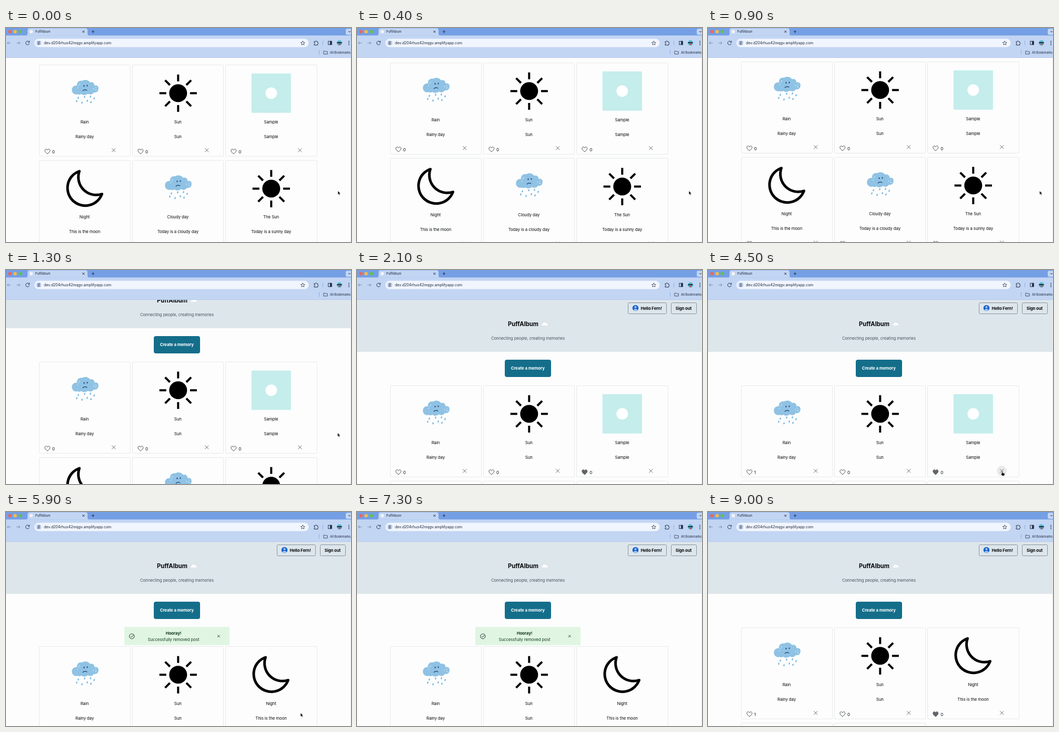
An HTML page that plays this animation: 656 by 408 pixels, repeating every 9100 ms.

```html
<!DOCTYPE html>
<html lang="en">
<head>
<meta charset="utf-8">
<title>PuffAlbum</title>
<style>
html, body { margin: 0; width: 100%; height: 100%; overflow: hidden; }
body {
  position: relative; background: #fdfdfd; color: #06090c;
  font: 7.8px/10px Inter, "Open Sans", sans-serif; letter-spacing: -.01em;
}
#stage { position: absolute; left: 0; top: 0; width: 656px; height: 408px; overflow: hidden; }
#stage * { box-sizing: border-box; }
#page, #page div, #page svg, #cards, #cursor, .bar { position: absolute; }
#page { left: 0; top: 0; width: 656px; height: 700px; }
#stage svg { overflow: visible; }
.bar { left: 0; top: 0; }
.mid { text-align: center; white-space: nowrap; }
b { font-weight: 700; }

.hero { left: 0; top: 57px; width: 656px; height: 98.5px; background: #dde6eb; }
.title { left: 287px; top: 95.5px; font: 700 11.2px/14px Inter, sans-serif; letter-spacing: 0; }
.tag { left: 225px; top: 125px; width: 200px; color: #4a545e; }
.btn { top: 62px; height: 21.5px; border: 1px solid #87929b; border-radius: 2.5px; line-height: 20px; font-weight: 700; }
.create {
  left: 281px; top: 170.5px; width: 87.5px; height: 33px; border-radius: 4px;
  background: #146e8a; color: #fff; font-weight: 700; line-height: 33px;
}
.toast { left: 225px; top: 219px; width: 199.5px; height: 35px; background: #e0f6e3; color: #173a22; }
.toast .mid { left: 0; top: 6px; width: 187px; line-height: 12px; }

#cards { left: 0; top: 0; }
.card { width: 174.5px; height: 174.5px; border: 1px solid #e8e9ea; border-radius: 2px; }
.card svg { left: -1px; top: -1px; }
.card .name, .card .note { left: -1px; width: 174px; }
.name { top: 102.3px; }
.note { top: 130.3px; }
.num { left: 24.2px; top: 159.5px; font-size: 8px; }
.heart { fill: none; stroke: #42474c; stroke-width: 1; }
.cross { fill: none; stroke: #555b60; stroke-width: .9; }

/* One loop is 9100 ms, so 1.0989% is 100 ms */
.a { animation: 9100ms step-end infinite; }
#page { animation-name: scroll; }
@keyframes scroll {
  0% { transform: translateY(-150px); animation-timing-function: steps(4, end); }
  4.39% { transform: translateY(-154px); animation-timing-function: steps(5, end); }
  9.88% { transform: translateY(-156px); }
  12.08% { transform: translateY(-128px); }
  13.18% { transform: translateY(-85px); }
  14.28% { transform: translateY(-45px); }
  15.38% { transform: translateY(-24px); }
  16.48% { transform: translateY(-11px); }
  17.58% { transform: translateY(-4px); }
  18.68%, 100% { transform: none; }
}
#cards { animation-name: push; }
@keyframes push {
  0% { transform: none; }
  64.83% { transform: translateY(36px); }
  97.8%, 100% { transform: none; }
}
.toast { animation-name: toast; }
@keyframes toast { 0% { opacity: 0; } 64.83% { opacity: 1; } 97.8%, 100% { opacity: 0; } }
.until { animation-name: until; }
@keyframes until { 0% { opacity: 1; } 61.53%, 100% { opacity: 0; } }
.after { animation-name: after; }
@keyframes after { 0% { opacity: 0; } 61.53%, 100% { opacity: 1; } }
.before-like { animation-name: unliked; }
@keyframes unliked { 0% { opacity: 1; } 29.67%, 100% { opacity: 0; } }
.liked { animation-name: liked; }
@keyframes liked { 0% { opacity: 0; } 29.67%, 100% { opacity: 1; } }
.fill { animation-name: fill; fill: #5e6367; }
@keyframes fill { 0% { opacity: 0; } 20.87%, 100% { opacity: 1; } }
.hover { animation-name: hover; fill: #e9eaeb; }
@keyframes hover { 0% { opacity: 0; } 49.45% { opacity: 1; } 64.83%, 100% { opacity: 0; } }

#cursor { left: 0; top: 0; width: 12px; height: 14px; animation-name: point; }
@keyframes point {
  0% { transform: translate(631px, 310.5px); }
  9.88% { transform: translate(630.5px, 310.5px); }
  16.48% { transform: translate(600px, 330px); }
  17.58% { transform: translate(520px, 362px); }
  18.68% { transform: translate(460px, 379px); }
  19.78% { transform: translate(433px, 385px); }
  23.07% { transform: translate(-40px, 0); }
  24.17% { transform: translate(200px, 388px); }
  25.27% { transform: translate(110px, 386px); }
  26.37% { transform: translate(79px, 385px); }
  30.76% { transform: translate(84px, 395px); }
  31.86% { transform: translate(-40px, 0); }
  45.05% { transform: translate(500px, 402px); }
  46.15% { transform: translate(528px, 394px); }
  47.25% { transform: translate(548px, 387px); }
  48.35% { transform: translate(557px, 384px); }
  49.45% { transform: translate(560px, 383px); }
  69.23% { transform: translate(572px, 350px); }
  70.32% { transform: translate(602px, 300px); }
  71.42% { transform: translate(622px, 271.5px); }
  80.21%, 100% { transform: translate(-40px, 0); }
}
.hand { animation-name: hand; }
@keyframes hand {
  0% { opacity: 0; } 19.78% { opacity: 1; } 23.07% { opacity: 0; }
  26.37% { opacity: 1; } 30.76% { opacity: 0; }
  49.45% { opacity: 1; } 64.83%, 100% { opacity: 0; }
}
.arrow { animation-name: arrow; }
@keyframes arrow {
  0% { opacity: 1; } 19.78% { opacity: 0; } 23.07% { opacity: 1; }
  26.37% { opacity: 0; } 30.76% { opacity: 1; }
  49.45% { opacity: 0; } 64.83%, 100% { opacity: 1; }
}
</style>
</head>
<body>
<svg width="0" height="0" style="position:absolute">
  <defs>
    <!-- Pictures are drawn around their own centre -->
    <g id="rain">
      <path fill="#8fc2e4" d="M-14 2C-20 3.500-25 0-25-6-25-12-21-15-15.500-14.500-16-21-11-25-5.500-23.500-1-26.500 7-25.500 9.500-20.500 14-22 18-19.500 18-14.500 23-16 26-13 25.500-8.500 25.500-3 21.500-.5 16.500-1.500 14.500 2.500 9.500 3.500 5.500 1 2 4-4 4.500-7 1.500-9 3-12 3-14 2Z"/>
      <g fill="#1d3f6e"><ellipse cx="-1.800" cy="-14" rx="1" ry="1.600"/><ellipse cx="4.200" cy="-14.500" rx="1" ry="1.600"/></g>
      <path d="M-4-4.800Q-.5-8 3.500-5.500" fill="none" stroke="#1d3f6e" stroke-width="1.300" stroke-linecap="round"/>
      <g fill="#e6f3fb">
        <circle cx="16" cy="-8.500" r=".9"/><circle cx="20.500" cy="-10.500" r=".8"/><circle cx="20.500" cy="-6" r="1"/>
        <circle cx="-14" cy="-10" r=".8"/><circle cx="-10.500" cy="-17" r=".9"/><circle cx="-12.500" cy="-14" r=".7"/>
      </g>
      <g id="drops" fill="#78b6e2"></g>
    </g>
    <g id="sun"><circle r="17"/><g id="rays"></g></g>
    <path id="moon" transform="translate(-.8 -.3)" d="M-10-33A33.800 33.800 0 1 0 33 10.500A34 34 0 0 1-10-33Z" fill="none" stroke="#000" stroke-width="5" stroke-linejoin="round"/>
    <g id="sample"><path d="M-37.500-37.500h75v75h-75z" fill="#c4edec"/><circle r="11" fill="#fff"/></g>
    <path id="heart" d="M0 4.700C-3 2.200-4.900.600-4.900-1.700-4.900-4.900-1.200-5.300 0-2.600 1.200-5.300 4.900-4.900 4.900-1.700 4.900.600 3 2.200 0 4.700Z"/>
    <path id="x" d="M-3.500-3.500L3.500 3.500M3.500-3.500L-3.500 3.500"/>
  </defs>
</svg>

<div id="stage">
  <div id="page" class="a">
    <div class="hero"></div>
    <div class="btn" style="left:515px;width:74px;padding-left:23.500px">Hello Fern!</div>
    <svg class="bar" width="1" height="1">
      <circle cx="529.500" cy="72.500" r="5.800" fill="#1d62d0"/>
      <circle cx="529.500" cy="70.800" r="2" fill="#a9cdf7"/>
      <path d="M525.800 76.500a3.800 3.300 0 0 1 7.400 0a5.500 5.500 0 0 1-7.400 0Z" fill="#a9cdf7"/>
      <path d="M352.500 106.500a2.500 2.500 0 0 1 .5-4.800a3.500 3.500 0 0 1 6-1.300a3 3 0 0 1 3.300 2.300a2 2 0 0 1-.3 3.800Z" fill="#fafcfd" stroke="#c5ced4" stroke-width=".5"/>
    </svg>
    <div class="btn mid" style="left:596.500px;width:49px">Sign out</div>
    <div class="title">PuffAlbum</div>
    <div class="tag mid">Connecting people, creating memories</div>
    <div class="create mid">Create a memory</div>
    <div id="cards" class="a"></div>
    <div class="toast a">
      <svg class="bar" width="1" height="1" fill="none" stroke="#1f3326">
        <circle cx="14.300" cy="18" r="4.700"/><path d="M12 18l1.800 1.800 4-4.500"/>
        <use href="#x" transform="translate(179.300 17.800) scale(.62)" stroke-width="1.400"/>
      </svg>
      <div class="mid"><b>Hooray!</b><br>Successfully removed post</div>
    </div>
  </div>

  <svg class="bar" width="656" height="408">
    <path d="M0 0h656v57H0z" fill="#c2d5f3"/>
    <path d="M0 0h656v14.300H0z" fill="#759fe5"/>
    <path d="M37 14.500q4 0 4-4V4.500q0-4 4-4h106q4 0 4 4v6q0 4 4 4z" fill="#c2d5f3"/>
    <path d="M0 56.500h656" stroke="#b7caea"/>
    <path d="M655.500 57v351" stroke="#ececec"/>
    <circle cx="7.500" cy="7" r="3.200" fill="#ee655b"/>
    <circle cx="17.300" cy="7" r="3.200" fill="#f2bd4b"/>
    <circle cx="27.200" cy="7" r="3.200" fill="#5ec251"/>
    <circle cx="48" cy="7" r="3.200" fill="#f1f3f5"/>
    <rect x="54" y="20.500" width="521.500" height="16" rx="8" fill="#f1f5fd"/>
    <circle cx="62.300" cy="28.500" r="5.700" fill="#d5e2f8"/>
    <rect x="646" y="1.500" width="14" height="11.500" rx="3" fill="#c2d5f3"/>
    <g fill="#1e2a3c" font-family="Inter, sans-serif">
      <text x="55.800" y="9.200" font-size="6">PuffAlbum</text>
      <text x="72" y="31" font-size="7.120">dev.d204rhuo42mqgv.amplifyapp.com</text>
      <text x="616" y="48.700" font-size="5.950">All Bookmarks</text>
      <circle cx="652" cy="25.300" r=".9"/><circle cx="652" cy="28.500" r=".9"/><circle cx="652" cy="31.700" r=".9"/>
    </g>
    <g fill="none" stroke="#26334a" stroke-width="1">
      <path d="M145.300 5l4 4m0-4l-4 4M165.500 4.200v5.600m-2.800-2.800h5.600M651 6l2 2 2-2"/>
      <path d="M43.800 26.500a3.500 3.500 0 1 0 .5 3M44.500 24.500v2.700h-2.700"/>
      <path d="M59.300 26.800h2m2.800 0h1.300M59.300 30.300h1.300m2.600 0h2.200"/>
      <circle cx="62.600" cy="26.800" r="1"/><circle cx="61.900" cy="30.300" r="1"/>
      <path d="M564.300 24.700l1.100 2.600 2.800.2-2.100 1.900.6 2.800-2.400-1.500-2.400 1.500.6-2.800-2.100-1.900 2.800-.2z" stroke-width=".8"/>
      <path d="M586 26h2a1.300 1.300 0 0 1 2.600 0h2v2a1.300 1.300 0 0 1 0 2.600v2H586v-2a1.300 1.300 0 0 0 0-2.600z"/>
      <rect x="612.800" y="25.300" width="6.400" height="6.400"/>
      <path d="M616.500 25.300h2.700v6.400h-2.700z" fill="#26334a"/>
      <path d="M604 44h2.500l1 1h3.700v4.700H604z" stroke-width=".8"/>
      <path d="M602.500 24.500v8M595.500 42v9" stroke="#8fb0e8"/>
      <path d="M9 28.500H2.500m2.700-2.800l-2.800 2.800 2.800 2.800M20 28.500h6.500m-2.700-2.800l2.800 2.800-2.800 2.800" stroke="#7e90b0"/>
    </g>
    <circle cx="634" cy="28.500" r="5" fill="#4fb6d2"/>
    <path d="M629.500 27h9v2h-9z" fill="#22262e"/>
    <path d="M632 30h5l-1 2.500h-3z" fill="#c94a55"/>
  </svg>

  <div id="cursor" class="a">
    <svg class="bar" width="12" height="14" stroke="#fff" stroke-width=".6">
      <path class="a arrow" d="M0 0v7.300l1.700-1.500 1.200 2.700 1.300-.6-1.200-2.600h2.300z"/>
      <path class="a hand" d="M-1.500.800q.8-.9 1.600 0v3l2.800.6q1.400.3 1.200 1.700l-.6 3.200H-.900l-2.300-3.600q.3-1.200 1.700 0z"/>
    </svg>
  </div>
</div>

<script>
const $ = id => document.getElementById(id);

const drops = [[-13, 9], [-1, 7], [10, 6.500], [17, 10], [-16, 15], [-6, 18], [4, 14.500], [11, 17]];
$('drops').innerHTML = drops.map(([x, y]) =>
  `<path transform="translate(${x} ${y})" d="M.8-2.500Q2.300 1 .500 2-1.500 2.300-1.300.300-.900-1 .8-2.500Z"/>`).join('');
$('rays').innerHTML = [...Array(8).keys()].map(i =>
  `<path transform="rotate(${i * 45})" d="M-2-${i % 2 ? 35 : 35.6}h4v13h-4z"/>`).join('');

const body = (pic, name, note, cls = '') => `<div class="${cls}" style="left:0;top:0">
  <svg width="1" height="1"><use href="#${pic}" x="87.300" y="54.300"/></svg>
  <div class="name mid">${name}</div><div class="note mid">${note}</div></div>`;

function card(col, row, content, { cls = '', count = '<div class="num">0</div>', extra = '', hover = '' } = {}) {
  const left = 62.500 + col * 177.300, top = 220.400 + row * 181.700;
  return `<div class="card ${cls}" style="left:${left}px;top:${top}px">${content}
    <svg width="1" height="1">${hover}
      <use href="#heart" class="heart" x="15.800" y="165.300"/>${extra}
      <use href="#x" class="cross" x="141.700" y="163"/></svg>${count}</div>`;
}

$('cards').innerHTML = [
  card(0, 0, body('rain', 'Rain', 'Rainy day'), {
    count: '<div class="num a before-like">0</div><div class="num a liked">1</div>' }),
  card(1, 0, body('sun', 'Sun', 'Sun')),
  card(2, 0, body('sample', 'Sample', 'Sample', 'a until') + body('moon', 'Night', 'This is the moon', 'a after'), {
    extra: '<use href="#heart" class="a fill" x="15.800" y="165.300"/>',
    hover: '<circle class="a hover" cx="141.700" cy="163" r="9.500"/>' }),
  card(0, 1, body('moon', 'Night', 'This is the moon')),
  card(1, 1, body('rain', 'Cloudy day', 'Today is a cloudy day')),
  card(2, 1, body('sun', 'The Sun', 'Today is a sunny day'), { cls: 'a until' })
].join('');
</script>
</body>
</html>
```
